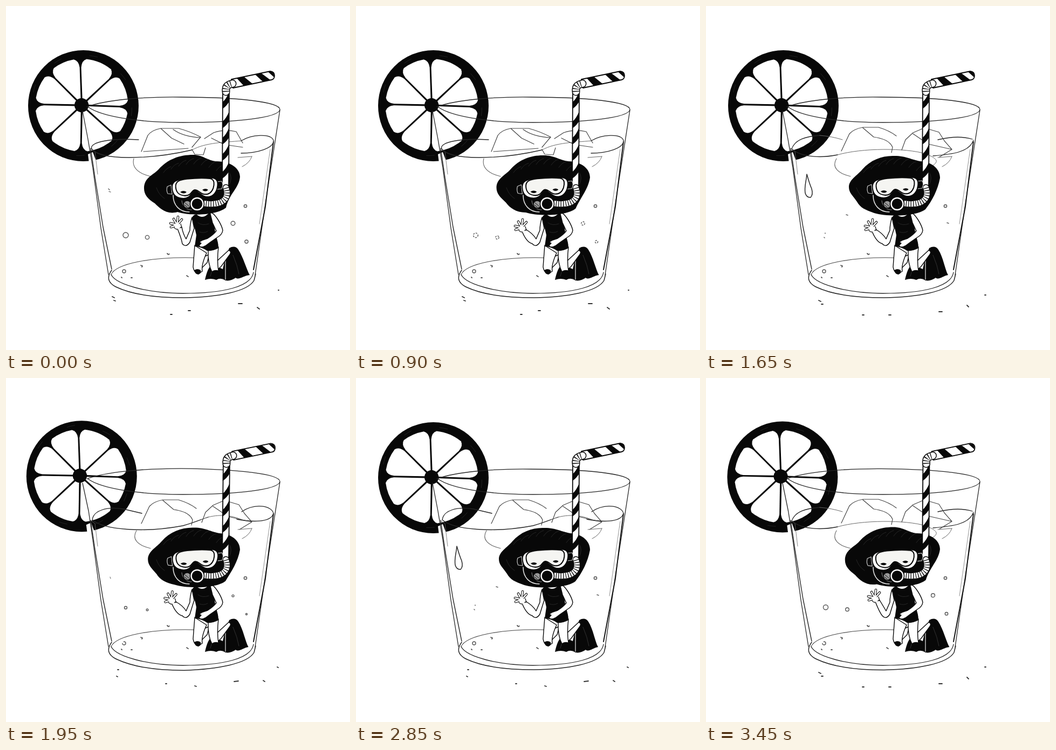
An HTML page that plays this animation: 638 px wide and 638 px high, repeating every 3.6 s.

```html
<!DOCTYPE html>
<html lang="en">
<head>
<meta charset="utf-8">
<title>Diver in a glass</title>
<style>
html, body { margin: 0; width: 100%; height: 100%; overflow: hidden; background: #fff; }
svg { display: block; width: 100vw; height: 100vh; }
</style>
</head>
<body>
<svg viewBox="0 0 638 638" fill="none" stroke-linecap="round" stroke-linejoin="round">
  <g id="art"></g>
</svg>
<script>
const art = document.getElementById('art');
const STEP = 150, STEPS = 24;
const INK = '#080808', PENCIL = '#262626', FAINT = '#666';

const line = (d, w = 1.3, c = PENCIL) => `<path d="${d}" stroke="${c}" stroke-width="${w}"/>`;
const fill = (d, c = INK) => `<path d="${d}" fill="${c}"/>`;
const shape = (d, w = 1.4, c = '#fff', ink = INK) => `<path d="${d}" fill="${c}" stroke="${ink}" stroke-width="${w}"/>`;
const disc = (x, y, r, c, w = 0) => `<circle cx="${x}" cy="${y}" r="${r}" fill="${c}" stroke="${INK}" stroke-width="${w}"/>`;
const group = (s, t) => `<g transform="${t}">${s}</g>`;
const mix = (a, b, k) => a + (b - a) * k;

function polar(r, deg) {
  const a = deg * Math.PI / 180;
  return `${(140.5 + r * Math.cos(a)).toFixed(1)},${(184 + r * Math.sin(a)).toFixed(1)}`;
}

function lime(v) {
  const spokes = [-92, -43, 2, 42, 91, 137, 181, 225, 268];
  let s = `<ellipse cx="143.5" cy="185" rx="102.5" ry="103" fill="${INK}"/>`;
  for (let i = 0; i < 8; i++) {
    const a = spokes[i], b = spokes[i + 1];
    s += fill(`M${polar(13, a + 7)}L${polar(70, a + 1.2)}Q${polar(83, a + 2)} ${polar(86, a + 8)}` +
      `A87,87 0 0 1 ${polar(86, b - 8)}Q${polar(83, b - 2)} ${polar(70, b - 1.2)}L${polar(13, b - 7)}Z`, '#fff');
  }
  s += disc(140, 184, 13, INK);
  s += fill('M152,275L161,271L168,290L154,291Z', '#fff');
  // Scribbled highlights on the peel.
  for (let i = 0; i < 7; i++) {
    const a = 195 + i * 42 + v * 9;
    s += line(`M${polar(93, a)}A93,93 0 0 1 ${polar(94, a + 9)}`, 0.6, '#333');
  }
  return group(s, `translate(${-v * 1.6} ${-v * 1.4})`);
}

function glass(v) {
  const d = v * 0.6;
  return line(`M150,187C185,174 255,168 325,${169 - d}C430,169 508,178 508,192C506,207 430,216 328,216C240,216 175,204 152,187`) +
    line(`M142,195L${152 + d},247L161,300L176,412L190,498`) +
    line('M157,264L165,318L180,410L196,488', 1.4) +
    line('M158,265L165,270L170,312', 0.8, FAINT) +
    line('M508,193L498,258L482,360L462,499') +
    line('M496,252L481,372L459,489', 1.9, '#111') +
    line('M490,266L470,404', 0.7, FAINT) +
    line(`M196,490C187,502 188,513 204,521C235,536 280,${541 + d} 330,${541 + d}C392,540 448,530 460,509L463,497`, 1.5) +
    line('M195,498C203,516 262,533 328,533C405,533 455,520 459,494') +
    line('M195,498C204,478 268,465 350,467', 1.1, '#444');
}

// Water line for each of the six bobbing positions: near edge, far edge.
const WATER = [
  ['M159,265C154,252 195,245 246,248M159,265C174,286 262,286 345,267M436,250C456,238 491,236 496,249C498,264 465,273 436,273', 'M345,267C370,253 405,253 436,250'],
  ['M160,263C162,246 186,238 218,243L252,251M160,263C180,281 254,288 328,274C350,268 362,262 375,258M437,248C462,231 493,237 496,251C492,269 454,267 428,262', 'M375,258C400,252 420,255 440,264'],
  ['M160,263C165,250 195,242 262,238M166,272C215,282 272,274 320,268M437,240C465,242 490,246 495,255C485,268 455,268 432,274', 'M320,268C360,270 400,280 432,274'],
  ['M160,265Q172,252 187,251M437,232Q470,250 496,250M438,263Q470,261 490,263M180,273Q215,268 248,266', 'M187,251Q225,237 267,232M248,266C300,262 350,270 390,281'],
  ['M160,262C180,245 190,237 215,236M437,237Q480,243 495,256M434,270Q470,269 493,263', 'M215,236Q240,237 264,241M158,274C230,273 320,268 374,281'],
  ['M159,265C165,248 184,242 211,240M159,265C180,283 220,281 244,276M430,248Q468,239 494,247M496,249C488,272 455,275 421,278', 'M211,240Q235,242 253,248M244,276C290,263 370,263 407,274C430,283 432,289 420,296']
];
const ICE_Y = [0, -1, -3, -8, -4, -2];

function drink(n) {
  const [near, far] = WATER[n], low = n === 0;
  const left = low
    ? 'M251,270L263,240Q270,230 287,227L320,227Q340,232 361,243L345,262M287,227L307,245L330,256M310,229Q330,243 361,244M255,270L338,264'
    : 'M251,271L266,239Q274,230 291,227L320,227Q340,233 353,243M291,228L311,245Q340,249 346,264L344,274';
  const right = low
    ? 'M368,246L385,235Q405,228 427,233L439,254M381,245L405,257L439,262M345,266L350,275L366,276L370,263'
    : 'M363,269L370,250L384,237L405,228L432,236L442,252L456,268M384,239L412,258L456,268L433,282';
  return line(near) + line(far, 1, FAINT) +
    group(line(left, 1.2, '#444') + line(right, 1.2, '#444'), `translate(0 ${ICE_Y[n]})`) +
    line(`M${low ? 237 : 242},283C233,298 243,310 268,316`, 1.1, FAINT) +
    line('M456,279Q452,291 438,298M430,281L456,279', 1, FAINT);
}

const stripes = ys => ys.map(y => fill(`M414,${y - 16}L414,${y + 2}Q409,${y + 11} 401,${y + 16}L401,${y + 4}Q409,${y - 3} 414,${y - 16}Z`)).join('');

function ribbed(d, w) {
  return line(d, w + 3, INK) + line(d, w, '#fff') +
    `<path d="${d}" stroke="${INK}" stroke-width="${w}" stroke-dasharray="1.3 3.2" stroke-linecap="butt"/>`;
}

function straw(v) {
  let s = shape('M402,157L414,157L413,338L401,338Z', 1.8) + stripes([175, 211, 241, 271, 304]);
  s += shape('M418,136L490,121Q498,122 498,129Q498,136 492,137L421,152Z', 1.8);
  s += fill('M428,134L441,131L457,144L441,148Z') + fill('M462,127L474,125L490,137L476,140Z') + fill('M486,122L494,122Q498,126 497,132Z');
  s += ribbed('M408,159C407,149 411,146 420,144', 12);
  return group(s, `rotate(${v * 0.15} 408 338)`);
}

const HAIR_A = [256,338, 256,318, 274,313, 283,303, 300,284, 322,276, 347,276, 365,276, 374,287, 390,288, 418,288, 434,302, 434,317,
  432,338, 414,348, 408,374, 392,388, 342,390, 318,382, 298,388, 284,374, 276,366, 263,358, 256,350, 256,338];
const HAIR_B = [265,336, 265,322, 280,315, 290,303, 305,286, 325,278, 346,278, 370,277, 380,285, 398,288, 422,290, 434,304, 434,319,
  430,341, 419,362, 407,377, 390,391, 335,391, 312,384, 295,378, 286,374, 280,363, 273,352, 265,347, 265,336];

function hair(k) {
  const p = HAIR_A.map((a, i) => mix(a, HAIR_B[i], k).toFixed(1));
  let s = fill(`M${p.slice(0, 2)}C${p.slice(2)}Z`);
  for (let i = 0; i < 8; i++) {
    const x = 292 + i * 14, y = 309 - 16 * Math.sin(i / 2.4);
    s += line(`M${x},${y}q6,-9 14,-11`, 0.6, '#3c3c3c');
  }
  return s + line('M279,337q4,13 15,20M414,309q7,9 0,22', 0.6, '#3c3c3c');
}

function arm(k) {
  const x = mix(317, 307, k), y = mix(404, 409, k), wx = x + 5, wy = y + 9;
  const fingers = [[-11, 6], [-12, -1], [-6, -9], [2, -13], [9, -8]]
    .map(([dx, dy]) => `M${x},${y + 2}L${x + dx},${y + dy}`).join('');
  return shape(`M${wx - 4},${wy}Q${wx + 4},${wy + 20} 327,441Q334,449 341,438L349,412L345,392` +
      `Q341,405 341,416L334,432Q328,422 ${wx + 4},${wy - 3}Z`) +
    line(fingers, 4.6, INK) + line(fingers, 2.5, '#fff') +
    `<ellipse cx="${x + 1}" cy="${y + 5}" rx="5" ry="6" fill="#fff"/>` +
    line(`M${x - 5},${y + 7}Q${x - 2},${y + 11} ${wx - 3},${wy + 1}M${x + 7},${y}L${wx + 4},${wy - 2}`, 1.2, INK);
}

function body(k) {
  const flick = mix(0, -3, k);
  return fill(`M369,508C372,494 376,483 383,479L402,488L406,470L414,449Q425,443 431,452C440,466 ${446 + flick},488 ${452 + flick},499` +
      'C440,500 432,509 426,504Q416,511 407,509Q398,503 390,508Q380,504 369,508Z') +
    line('M407,463L407,507', 1.3, '#ddd') + line('M421,462Q429,480 432,497M383,487L379,501', 0.7, '#444') +
    shape('M388,476L413,453Q419,455 415,461L399,483L391,490Z') +
    shape('M358,491L373,476L377,461L366,465Z') +
    shape('M350,444L347,484Q349,496 358,496L364,492Q362,480 372,458Z') +
    shape('M375,453Q374,478 382,493Q389,500 394,491Q391,472 394,447Z') +
    fill('M349,490Q355,486 361,490Q363,495 357,498Q350,497 349,490Z') +
    fill('M382,492Q388,488 395,491Q396,498 389,499Q383,498 382,492Z') +
    shape('M352,378L374,376L380,392L354,394Z', 1) +
    fill('M343,396Q348,385 354,387Q366,397 378,382Q385,388 386,406L389,426Q394,438 394,449Q384,455 373,454Q361,446 350,446L353,425Q350,408 343,396Z') +
    line('M356,402q8,6 20,2M359,419q8,3 15,-1M360,434l6,2', 0.5, '#444') +
    shape('M378,382C388,384 400,406 402,416Q401,424 392,429L379,438L371,444Q360,450 358,444L362,440L358,438L365,434L374,431Q386,423 390,417L383,402Z');
}

const LENS = 'M308,338C307,326 315,322 333,320Q362,317 384,319C395,321 393,333 391,340Q386,354 373,354C362,354 360,344 350,344C343,345 343,357 329,357C315,356 309,350 308,338Z';

function face(k) {
  const mask = shape('M306,332L299,335Q297,342 300,348L308,349Z', 1.2, INK, '#ccc') +
    shape('M391,326L400,325Q404,332 400,339L391,340Z', 1.2, INK, '#ccc') +
    shape(LENS, 2) +
    group(shape(LENS, 2.4, '#f5f5f2'), 'translate(56 52) scale(.84 .84)') +
    fill('M323,345Q329,341 335,345Q330,350 323,345Z') + fill('M364,341Q370,337 375,341Q370,346 364,341Z') +
    fill('M343,346Q350,336 357,345L353,358L347,358Z');
  return line('M310,351C310,370 322,382 340,382', 1.5, '#eee') +
    line('M326,361C327,373 336,378 344,378', 0.8, '#aaa') +
    ribbed('M366,366C386,369 401,366 407,357C411,351 410,343 408,337', 10) +
    group(mask, `translate(${k * 0.8} ${-k})`) +
    disc(336, 368, 7, '#999', 1.5) + line('M332,365l7,6M331,369l5,4', 1, INK) +
    disc(354.5, 367, 13, '#fff', 1.6) + disc(354.5, 367, 9.8, INK);
}

function drip(p) {
  if (p === 0) return line('M190,339l2,2M191,344l3,1', 1.3, '#555');
  if (p === 5) return line('M193,369l1,3', 1.1, '#777');
  const size = [0, 0.4, 0.75, 1, 0.6][p];
  if (!size) return '';
  return group(line('M187,312C186,325 182,335 184,347Q187,356 194,355Q199,350 196,339Q192,330 187,312Z', 1.5),
    `translate(${188 + (p === 4 ? 4 : 0)} ${333 + (p === 4 ? 22 : 0)}) scale(${size}) translate(-188 -333)`);
}

// x, y and radius of the bubbles that swell and pop.
const BUBBLES = [[222, 425, 5], [262, 429, 3.6], [421, 403, 3.8], [446, 437, 3]];
const SWELL = [1, 0.9, 0, 0, 0.3, 0.5, 0.85, 0.9];

function bubbles(p) {
  let s = '';
  for (const [x, y, r] of BUBBLES) {
    const q = SWELL[p] * r;
    if (q) s += `<circle cx="${x}" cy="${y + (1 - SWELL[p]) * 2}" r="${q}" stroke="#555" stroke-width="1.4"` +
      (p === 6 ? ' stroke-dasharray="2 3"' : '') + '/>';
  }
  if (!SWELL[p]) s += line('M260,387l3,1M219,429l1,1M221,421l0,1M447,402l3,1', 1.6, '#666');
  s += `<circle cx="444" cy="371" r="2.6" stroke="#555" stroke-width="1.5"/>`;
  s += `<circle cx="219" cy="492" r="3" stroke="#555" stroke-width="1.4" stroke-dasharray="${p % 3 ? '9 4' : 'none'}"/>`;
  return s + line('M299,459l2,2l2,-1M250,481l3,1l-1,2M232,504l2,0M335,500l3,2M214,503l1,1', 1.8, '#555');
}

const SPECKS = [
  'M197,539l4,2M200,546l3,1M305,572l3,0M338,565l4,0M431,552l7,0M466,559l4,3M505,527l1,0',
  'M207,541l2,0M205,553l2,1M296,567l2,0M350,571l3,1M423,563l8,-1M477,561l3,2M503,536l2,1',
  'M209,546l4,2M214,553l3,0M290,573l3,0M339,573l4,0M432,567l6,0M484,555l3,3M517,536l2,0'
];

const HAIR_K = [0, 0.3, 0.7, 1, 1, 0.8, 0.5, 0.2];
const ARM_K = [0, 0.35, 0.75, 1, 1.05, 1.05, 1, 0.4];

function draw(step) {
  const p = step % 8, v = p % 3, k = HAIR_K[p];
  art.innerHTML = lime(v) + glass(v) + drink(step % 6) +
    body(k) + hair(k) + arm(ARM_K[p]) + straw(v) + face(k) +
    bubbles(p) + drip(p) + line(SPECKS[step % 3], 1.8, '#333');
}

let shown = -1;
function tick() {
  const step = Math.floor(performance.now() / STEP) % STEPS;
  if (step !== shown) draw(shown = step);
  requestAnimationFrame(tick);
}
tick();
</script>
</body>
</html>
```
